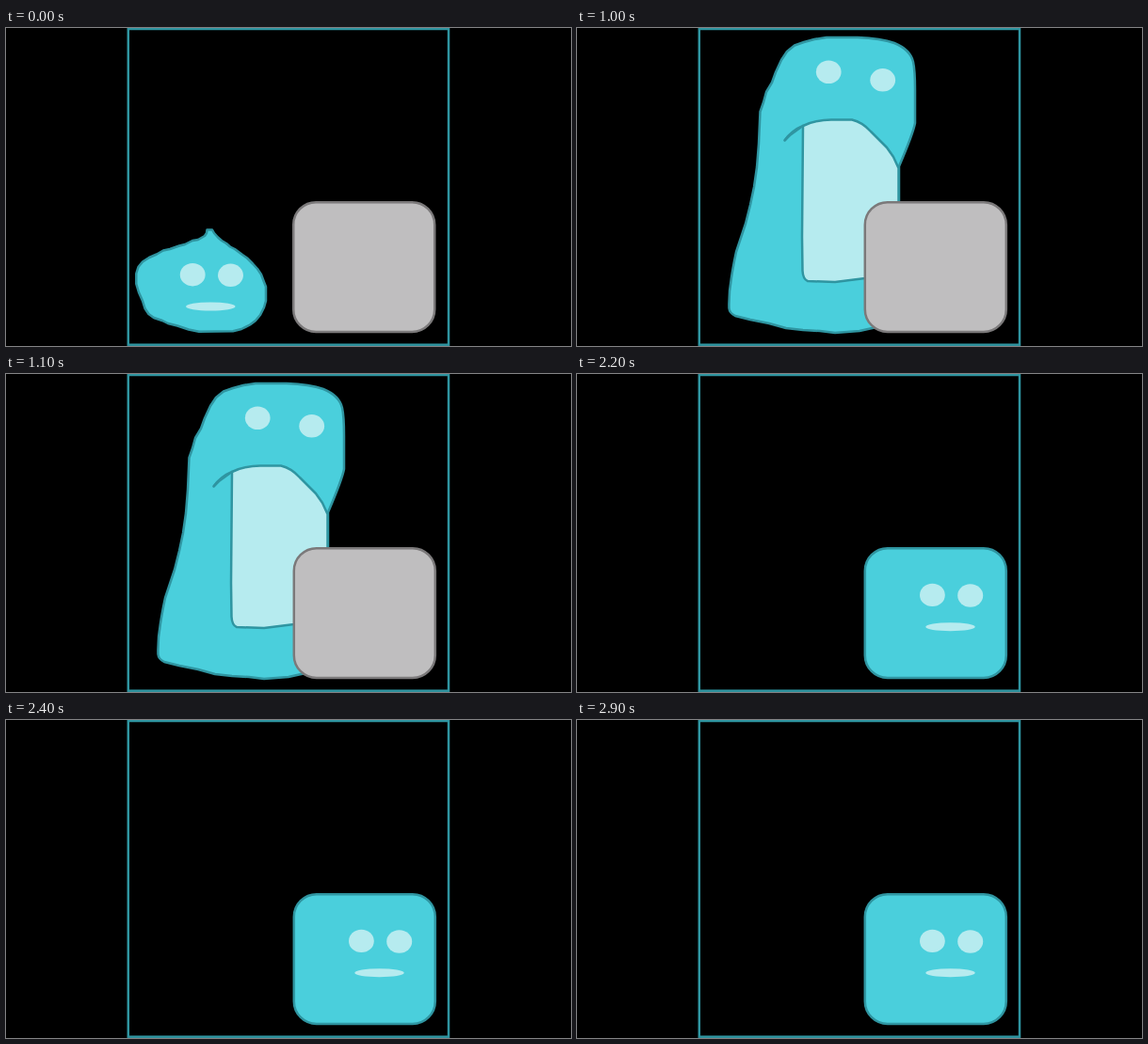
An HTML page without scripts for the animation above (3000 ms loop, 600 by 338 pixels).

```html
<!DOCTYPE html>
<html lang="en">
<head>
<meta charset="utf-8">
<title>Slime and box</title>
<style>
  html, body { margin: 0; width: 100%; height: 100%; overflow: hidden; background: #000; }
  svg { display: block; width: 100%; height: 100%; }
  .line { stroke: #2f95a1; stroke-width: 2.5; stroke-linejoin: round; stroke-linecap: round; }
  .body { fill: #4acfdc; }
  .pale { fill: #b6ebef; }
  .none { fill: none; }
  .box { fill: #bfbebf; stroke: #7b797a; stroke-width: 2.5; }
  .pose { visibility: hidden; animation: 3s step-end infinite; }
  .rest { animation-name: rest; }
  .rise { animation-name: rise; }
  .copy { animation-name: copy; }
  @keyframes rest { 0% { visibility: visible; } 33.333%, 100% { visibility: hidden; } }
  @keyframes rise { 0% { visibility: hidden; } 33.333% { visibility: visible; } 66.666%, 100% { visibility: hidden; } }
  @keyframes copy { 0% { visibility: hidden; } 66.666%, 100% { visibility: visible; } }
</style>
</head>
<body>
<svg viewBox="0 0 600 338">
  <defs>
    <g id="face" class="pale">
      <ellipse cx="198.2" cy="262.2" rx="13.4" ry="12.2"/>
      <ellipse cx="238.5" cy="262.8" rx="13.5" ry="12.2"/>
      <ellipse cx="217.3" cy="296" rx="26.2" ry="4.5"/>
    </g>
    <rect id="block" x="305.6" y="185.2" width="150" height="137.8" rx="24"/>
  </defs>

  <g class="pose rest">
    <path class="line body" d="M213.5 214.5L219 214.5L221 218L225 222.5L229 226L234 229L238 232.500L243 235L251 241
      L256 244.500L262 250.500L267 256L271 262L274 270L276 275V290L274 297L270 305L265 311L259 315.500L250 320L241 322.300
      L205 322.800L194 320.500L188 318.500L182 316.500L172 314L166 311L157 308L151.500 304L147.500 298L145 290L141 281L138.300 272
      V261L140.500 254L145 248.500L152 244L160 240.500L167 236.500L174 235L184 231.500L190 230L198 226L204 225L211 221L213 218Z"/>
    <use href="#face"/>
    <use href="#block" class="box" x="-.4"/>
  </g>

  <g class="pose rise">
    <path class="line body" d="M265 10H298Q323 11 337 16Q354 23 357 36Q359 45 359 66V101Q357 112 342 147V300L318 318
      L300 322L274 324L258 322L240 321L222 319L204 314L184 310L168 306Q162 303 161.500 298Q161 282 164 265Q166 252 169 238
      L174 223L179 208L184 188L188 169L191 148L193 123L194.500 89L198 79L201 68L207 58L211 47L217 34L223 25L231 18.500L241 15L252 12Z"/>
    <path class="line pale" d="M240 104Q254 97.500 270 97.500H292Q303 100 312 110L321 119L329 127L336 137L341.500 149V260
      L306 266L274 270L245 269Q240 267 239.500 258L239 222Z"/>
    <path class="line none" d="M240 104Q228 109 220.500 119.500"/>
    <path class="line none" d="M221 119Q226 112 237 106L226 114Z"/>
    <ellipse class="pale" cx="267.200" cy="46.700" rx="13.400" ry="12.300"/>
    <ellipse class="pale" cx="324.700" cy="55.300" rx="13.400" ry="12.200"/>
    <use href="#block" class="box" x=".2"/>
  </g>

  <g class="pose copy">
    <use href="#block" class="line body" x=".2"/>
    <use href="#face" x="179.200" y="-27.300"/>
  </g>

  <rect class="line none" x="129.800" y="1" width="340.200" height="335.700" style="stroke-linejoin: miter"/>
</svg>
</body>
</html>
```
